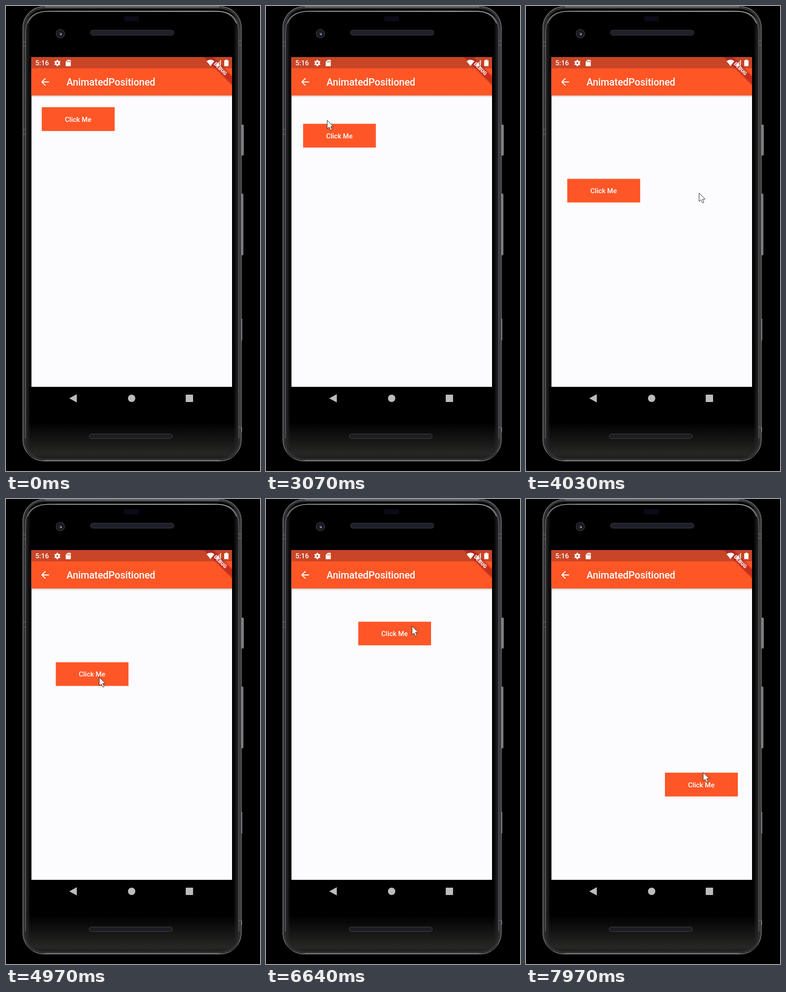
An HTML page that plays this animation: 554 by 1011 pixels, repeating every 8 s.

```html
<!DOCTYPE html>
<html lang="en">
<head>
<meta charset="utf-8">
<title>Moving button</title>
<style>
html, body { margin: 0; width: 100%; height: 100%; overflow: hidden; background: #000; }
svg { display: block; width: 554px; height: 1011px; font-family: Roboto, sans-serif; }
text { fill: #fff; }
#button { animation: button 8s linear infinite; }
#cursor { animation: cursor 8s ease-in-out infinite; }

@keyframes button {
  0%, 35.49% { transform: translate(78px, 220px); }
  47.99%, 60% { transform: translate(90px, 375.6px); }
  72.5%, 82.57% { transform: translate(197.4px, 254.5px); }
  95.07%, 100% { transform: translate(303px, 595px); }
}
@keyframes cursor {
  0%, 10.4% { transform: translate(560px, 400px); }
  13.25%, 16.8% { transform: translate(450px, 394px); }
  17.5%, 19.8% { transform: translate(234px, 570px); }
  20% { transform: translate(218px, 544px); }
  22.1%, 24% { transform: translate(183px, 497px); }
  33.4%, 41.25% { transform: translate(133px, 248px); }
  50%, 52.75% { transform: translate(377px, 406px); }
  56.6%, 62.5% { transform: translate(203px, 387px); }
  68.5%, 73.75% { transform: translate(315px, 313px); }
  79.25%, 88.75% { transform: translate(318px, 276px); }
  99.6%, 100% { transform: translate(386px, 594px); }
}
</style>
</head>
<body>
<svg viewBox="0 0 554 1011">
  <defs>
    <linearGradient id="sides">
      <stop offset="0" stop-color="#444446"/>
      <stop offset=".015" stop-color="#242425"/>
      <stop offset=".035" stop-color="#000"/>
      <stop offset=".965" stop-color="#000"/>
      <stop offset=".985" stop-color="#242425"/>
      <stop offset="1" stop-color="#444446"/>
    </linearGradient>
    <linearGradient id="chin" x2="0" y2="1">
      <stop offset="0" stop-color="#272726" stop-opacity="0"/>
      <stop offset=".85" stop-color="#272726"/>
      <stop offset="1" stop-color="#1a1a1a"/>
    </linearGradient>
    <linearGradient id="shine">
      <stop offset="0" stop-color="#666"/>
      <stop offset=".15" stop-color="#999"/>
      <stop offset=".8" stop-color="#bbb"/>
      <stop offset="1" stop-color="#888"/>
    </linearGradient>
    <linearGradient id="key">
      <stop offset="0" stop-color="#48484c"/>
      <stop offset=".6" stop-color="#8b8b90"/>
      <stop offset="1" stop-color="#5a5a5e"/>
    </linearGradient>
    <linearGradient id="shadow" x2="0" y2="1">
      <stop offset="0" stop-color="#000" stop-opacity=".22"/>
      <stop offset="1" stop-color="#000" stop-opacity="0"/>
    </linearGradient>
    <clipPath id="screen"><path d="M55.500 111H493V828H55.500z"/></clipPath>
  </defs>

  <!-- side keys -->
  <g fill="url(#key)">
    <rect x="511" y="258" width="8" height="67" rx="2"/>
    <rect x="511" y="408" width="7" height="134" rx="2"/>
    <rect x="511" y="680" width="4.500" height="47" rx="1"/>
    <rect x="511" y="916" width="4" height="10" rx="1"/>
  </g>

  <!-- body -->
  <rect x="37" y="1.500" width="476" height="987.500" rx="46" fill="url(#sides)" stroke="#707075" stroke-width="1.800"/>
  <path d="M40 905H510V943Q510 987 467 987H83Q40 987 40 943z" fill="url(#chin)"/>
  <rect x="40" y="4.500" width="470" height="981.500" rx="43" fill="none" stroke="#303033" stroke-width="4"/>
  <path d="M42.500 940V58Q42.500 11.500 92 11.500H460Q508 11.500 508 58V940" fill="none" stroke="#5f5f64" stroke-width="1.600"/>
  <path d="M47 38Q58 11.500 92 11.500H460Q492 11.500 503 38" fill="none" stroke="url(#shine)" stroke-width="1.800"/>
  <path d="M85 2H465M85 988.500H465" stroke="#808085" stroke-width="1.800"/>
  <path d="M37 78h6m-6 9h6m-6 181h6m-6 11h6M507 76h6m-6 9h6M507 916h6" stroke="#77777c" stroke-width="1.200"/>

  <!-- camera, sensor, speakers -->
  <circle cx="118.500" cy="60" r="9" fill="#141417" stroke="#333338" stroke-width="2"/>
  <circle cx="118.500" cy="60" r="4.500" fill="#252b3c"/>
  <circle cx="120" cy="61.500" r="2" fill="#8492b4"/>
  <rect x="258" y="22" width="32" height="11" rx="3" fill="#0b0b18"/>
  <rect x="184.500" y="52.500" width="181.500" height="11" rx="4.500" fill="#20202a" stroke="#3b3b42"/>
  <rect x="181.500" y="930.500" width="181" height="10" rx="4.500" fill="#1c1c23" stroke="#44443f"/>

  <!-- screen -->
  <g clip-path="url(#screen)">
    <path fill="#fcfcfe" d="M55 111H493V828H55z"/>
    <path fill="url(#shadow)" d="M55 194H493v5H55z"/>
    <path fill="#ff5626" d="M55 135H493v59.500H55z"/>
    <path fill="#c94527" d="M55 111H493v24.500H55z"/>

    <path transform="translate(72.500 152.300) scale(1.0645)" fill="#fff" d="M20 11H7.830l5.590-5.590L12 4l-8 8 8 8 1.410-1.410L7.830 13H20z"/>
    <text x="132" y="173" font-size="21.300" font-weight="500">AnimatedPositioned</text>

    <g id="button">
      <path fill="#ff5628" d="M0 0H159V51.700H0z"/>
      <text x="79.300" y="31.500" font-size="14.900" font-weight="500" text-anchor="middle">Click Me</text>
    </g>

    <g transform="translate(493 111) rotate(45) scale(1.0645)">
      <path fill="#000" fill-opacity=".1" d="M-42 26H42V42H-42z"/>
      <path fill="#b71c1c" fill-opacity=".63" d="M-40 28H40V40H-40z"/>
      <text y="37.600" font-size="10.200" font-weight="900" text-anchor="middle">DEBUG</text>
    </g>

    <!-- status icons lie above the banner -->
    <text x="64" y="129.300" font-size="15" font-weight="500">5:16</text>
    <g fill="#fff">
      <g transform="translate(112 124)">
        <circle r="3.700" fill="none" stroke="#fff" stroke-width="3.200"/>
        <path d="M0-7V-4M0 7V4M-6-3.500-3.500-2M6 3.500 3.500 2M-6 3.500-3.500 2M6-3.500 3.500-2" stroke="#fff" stroke-width="3"/>
      </g>
      <path fill-rule="evenodd" d="M134.500 117H140q1.300 0 1.300 1.300V129.700Q141.300 131 140 131H131.500Q130.200 131 130.200 129.700V121.300zM133.500 119.800V122.500H134.800V119.800zM136 119.800V122.500H137.300V119.800zM138.400 119.800V122.500H139.700V119.800z"/>
      <path d="M437.500 120Q446 113.500 454.500 120L446 130.500z"/>
      <path d="M456 130 468.500 117V130z" fill-opacity=".35"/>
      <path d="M456 130 464 121.700V130zM467 118.500 468.500 117V130H467z"/>
      <path d="M479 116.500h3.200v1.500h2.300q.8 0 .8.800V130q0 .8-.8.800h-7.700q-.8 0-.8-.8V118.800q0-.8.800-.8H479z"/>
    </g>
  </g>

  <!-- navigation -->
  <g fill="#bcbcbc">
    <path d="M138 853 154.500 844V862z"/>
    <circle cx="274" cy="853" r="8"/>
    <rect x="392" y="845" width="16" height="16" rx="1"/>
  </g>

  <path id="cursor" d="M.5.5V19L4.700 15.200 8 22.200 11 20.800 7.900 14H13.700z" fill="#fff" stroke="#222" stroke-linejoin="round"/>
</svg>
</body>
</html>
```
